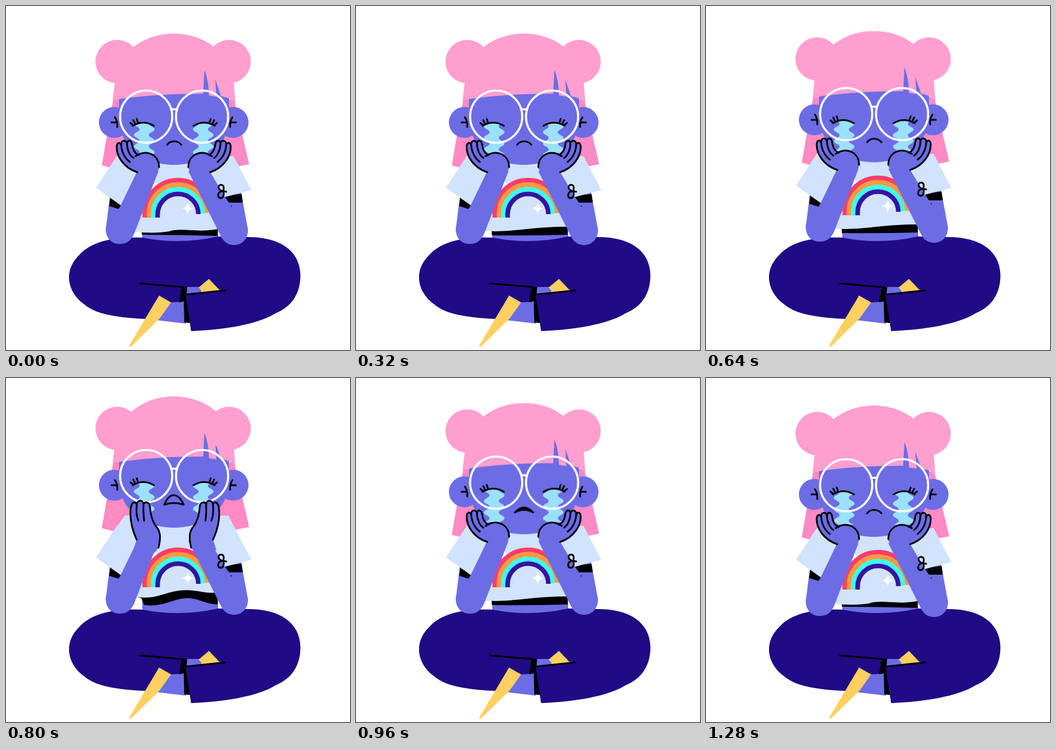
Write an HTML page without scripts that moves like this. It is 600 px wide and 600 px high and loops after 1360 ms.

```html
<!DOCTYPE html>
<html lang="en">
<head>
<meta charset="utf-8">
<title>Crying girl</title>
<style>
html, body { margin: 0; width: 100%; height: 100%; overflow: hidden; background: #fff; }
svg { display: block; width: 100vw; height: 100vh; }

.skin { fill: #6c6ce5; }
.hair { fill: #ff9fcf; }
.back-hair { fill: #ff8ac4; }
.cloth { fill: #d2e3ff; }
.pants { fill: #200a85; }
.shoe { fill: #ffcf60; }
.tear { fill: #9be1ff; }
.white { fill: #fff; }
.line { fill: none; stroke: #000; stroke-width: 3; stroke-linecap: round; stroke-linejoin: round; }
.glasses { fill: none; stroke: #fff; stroke-width: 3.6; }
.rainbow { fill: none; stroke-width: 8; }

/* 17 poses of 80 ms, held without blending */
.head, .buns, .face, .body, .wavy, .flat, .sob, .calm, .closed, .half {
  animation: 1.36s step-end infinite;
}
.head { animation-name: head; }
.buns { animation-name: buns; }
.face { animation-name: face; }
.body { animation-name: body; }
.wavy { animation-name: wavy; }
.flat { animation-name: flat; }
.sob { animation-name: sob; }
.calm { animation-name: calm; }
.closed { animation-name: closed; }
.half { animation-name: half; }
.flow { animation: flow 1.36s steps(17) infinite; }

@keyframes head {
  0%, 94.1% { transform: none; }
  47%, 70.5%, 88.2% { transform: translateY(-4.5px); }
  58.8%, 76.4% { transform: translateY(-16px); }
}
@keyframes buns {
  0%, 70.5%, 88.2% { transform: none; }
  58.8%, 76.4% { transform: translateY(7px); }
}
@keyframes face {
  0%, 23.5%, 47% { transform: none; }
  5.8%, 17.6%, 29.4%, 41.1% { transform: translateY(-3px); }
  11.7%, 35.2%, 52.9% { transform: translateY(-6px); }
}
@keyframes body {
  0%, 94.1% { transform: none; }
  47% { transform: translateY(-4px); }
}
@keyframes wavy {
  0%, 94.1% { opacity: 1; }
  11.7% { opacity: 0; }
}
@keyframes flat {
  0%, 58.8%, 76.4%, 94.1% { opacity: 0; }
  11.7%, 70.5%, 88.2% { opacity: 1; }
}
@keyframes sob {
  0%, 70.5%, 88.2% { opacity: 0; }
  58.8%, 76.4% { opacity: 1; }
}
@keyframes calm {
  0%, 70.5%, 88.2% { opacity: 1; }
  58.8%, 76.4% { opacity: 0; }
}
@keyframes closed {
  0%, 94.1% { opacity: 1; }
  52.9% { opacity: 0; }
}
@keyframes half {
  0%, 58.8%, 76.4%, 94.1% { opacity: 0; }
  52.9%, 70.5%, 88.2% { opacity: 1; }
}
@keyframes flow { to { transform: translateY(85px); } }
</style>
</head>
<body>
<svg viewBox="0 0 600 600">
  <defs>
    <clipPath id="tear-area"><path d="M221 208Q240 198 261 208V262H221Z"/></clipPath>

    <g id="eye">
      <g clip-path="url(#tear-area)">
        <path class="tear flow" d="M254 110q10 5 0 10t0 10t0 10t0 10t0 10t0 10t0 10t0 10t0 10t0 10t0 10t0 10t0 10t0 10t0 10t0 10t0 10H228q10-5 0-10t0-10t0-10t0-10t0-10t0-10t0-10t0-10t0-10t0-10t0-10t0-10t0-10t0-10t0-10t0-10t0-10Z"/>
      </g>
      <path class="line" d="M221 209Q240 198 258 209M217 204L222 208M222 199L225 205M228 197L230 203"/>
    </g>

    <g id="ear">
      <circle class="skin" cx="189" cy="203" r="27"/>
      <path class="line" d="M190 194Q195 201 194 211M184 203L194 203"/>
    </g>

    <g id="calm-hand">
      <path class="skin" d="M229 290C205 282 193 262 193 246C193 238 199 236 201 243C200 234 209 232 211 240C212 232 219 234 220 242C221 250 224 257 231 260C250 249 267 262 267 283L258 304L222 302Z"/>
      <path class="line" d="M229 290C205 282 193 262 193 246C193 238 199 236 201 243C200 234 209 232 211 240C212 232 219 234 220 242C221 250 225 257 231 260M201 243C202 257 209 267 216 272M211 240C211 251 216 261 222 265M226 262C247 248 267 261 267 281"/>
    </g>

    <g id="sob-hand">
      <path class="skin" d="M228 286C219 267 215 245 218 229C220 219 227 219 228 225C229 216 239 216 240 224C242 219 250 220 251 228C252 245 256 255 262 263C270 272 270 284 266 300L258 310L222 304Z"/>
      <path class="line" d="M228 286C219 267 215 245 218 229C220 219 227 219 228 225C229 216 239 216 240 224C242 219 250 220 251 228C252 245 256 255 262 263C270 272 270 284 266 300M228 225C227 240 228 246 231 253M240 224C239 238 240 245 241 253"/>
    </g>

    <path id="sparkle" class="white" d="M0-11Q1-1 11 0Q1 1 0 11Q-1 1-11 0Q-1-1 0-11Z"/>
  </defs>

  <path class="back-hair head" d="M187 163L167 278 187 283H388L424 276 398 163Z"/>

  <path class="skin" d="M237 372H370V412H238Z"/>

  <g class="body">
    <path class="skin" d="M182 325L174 390 205 400 210 325ZM375 325H410L422 390 390 400Z"/>
    <path d="M182 333L205 342 196 354 180 349ZM380 331L411 328 413 343H389Z"/>

    <g class="wavy">
      <path d="M236 385H369V401Q300 399 237 399Z"/>
      <path class="cloth" d="M222 360V394C250 396 268 396 285 393C306 386 335 396 369 389L372 360Z"/>
    </g>
    <g class="flat">
      <path d="M236 380H369V399Q300 401 237 400Z"/>
      <path class="cloth" d="M222 360V392C270 396 300 385 369 385L372 360Z"/>
    </g>
    <g class="sob">
      <path d="M226 385L236 388 241 400C275 404 290 389 315 388C338 388 345 398 369 399V372H240Z"/>
      <path class="cloth" d="M222 360V385C265 393 278 374 315 374C335 374 350 381 369 378L372 360Z"/>
      <path class="cloth" d="M193 264L207 244H388L398 264Z"/>
    </g>
    <path class="cloth" d="M193 262L157 317 202 349 223 345V370H370L375 335 428 321 397 262Z"/>

    <use href="#sparkle" x="257" y="311"/>
    <g class="rainbow">
      <path stroke="#ff3d68" d="M242 369V363.500A58 58 0 0 1 358 360"/>
      <path stroke="#ff9a3d" d="M249.500 369V363.500A50.500 50.500 0 0 1 350.500 361"/>
      <path stroke="#3dfff0" d="M257 369V363.500A43 43 0 0 1 343 362"/>
      <path stroke="#3414a0" d="M264.500 369V363.500A35.500 35.500 0 0 1 335.500 363"/>
    </g>
    <use href="#sparkle" x="317" y="353"/>
  </g>

  <path class="skin" d="M284 517L312 513 314 554 255 547ZM312 488H345L340 500 312 504Z"/>
  <path class="pants" d="M238 404C190 402 150 410 129 433C98 462 108 500 136 520C160 541 205 544 262 547L288 517 303 516 306 490H340L338 492 372 495 382 495 313 503 323 567C380 565 440 555 470 536C502 523 514 497 513.500 468C512 425 475 402 419 403L370 402Q303 417 238 404Z"/>
  <path d="M306 489L316 490 315 502 322 553 311 552 310 515 302 517Z"/>
  <path class="pants" d="M313 503L382 495 390 540 323 567Z"/>
  <path class="shoe" d="M336 491L354 476 373 496 343 499Z"/>
  <path class="line" stroke-linecap="butt" d="M234 484L306 490M316 503L382 496"/>
  <path class="shoe" d="M267 505L288 517 268 545 219 593Q214 597 215 592Z"/>

  <g class="head">
    <use href="#ear"/>
    <use href="#ear" transform="translate(585) scale(-1 1)"/>
    <path class="skin" d="M197 105H389V195C389 240 352 277 293 277C234 277 197 240 197 195Z"/>
    <g class="buns hair">
      <circle cx="194" cy="97" r="38"/>
      <circle cx="389" cy="97" r="38"/>
    </g>
    <path class="hair" d="M186 164L190 130C195 82 240 48 293 48C346 48 390 82 397 130L400 169 389 161 375 157 365 128 367 158 354 156C354 138 350 120 346 112L344 153C290 153 235 156 186 164Z"/>
    <g class="face">
      <use href="#eye"/>
      <use href="#eye" transform="translate(585) scale(-1 1)"/>
      <path class="line closed" d="M281 242C287 234 299 234 306 242"/>
      <path class="line half" d="M277 245Q293 228 309 245Q293 236 277 245Z" style="fill:#000"/>
      <path class="line sob" d="M276 243C285 221 300 221 310 243Q293 237 276 243Z"/>
      <g class="glasses">
        <circle cx="244.500" cy="193" r="45.500"/>
        <circle cx="342" cy="193" r="45.500"/>
        <path d="M288 181Q293 179 298 181"/>
      </g>
    </g>
  </g>

  <g class="body">
    <path class="skin" d="M229 288L196 356 174 386C173 406 185 415 198 415C212 415 219 408 224 396L266 288ZM355 288L388 343 422 388C423 406 412 417 398 417C388 417 380 412 375 402L318 288Z"/>
    <path class="line" stroke-width="2.500" d="M379 323C368 321 369 311 376 312C381 313 380 319 379 323C369 323 368 332 373 335C379 336 381 329 379 323L384 324"/>
    <circle cx="393" cy="349" r="1"/>
    <g class="calm">
      <use href="#calm-hand"/>
      <use href="#calm-hand" transform="translate(585) scale(-1 1)"/>
    </g>
    <g class="sob">
      <use href="#sob-hand"/>
      <use href="#sob-hand" transform="translate(589) scale(-1 1)"/>
    </g>
  </g>
</svg>
</body>
</html>
```
